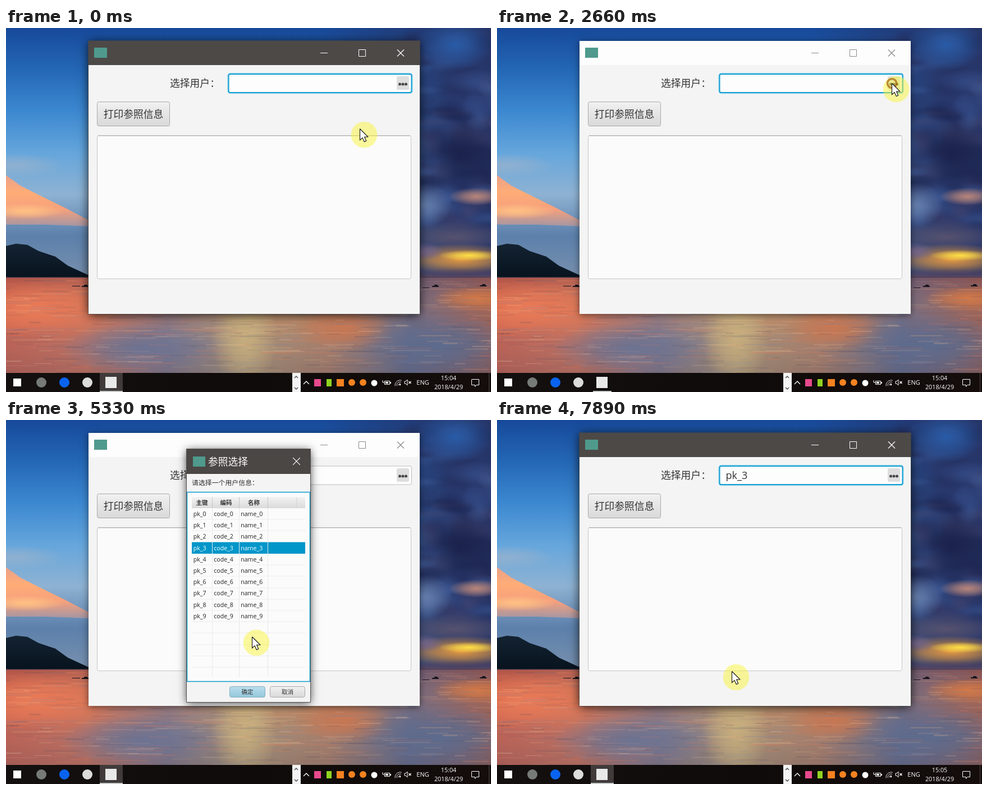
Recreate the animation shown at these times as an HTML page with a canvas. Size 864 by 648 pixels, loop 8 s.

```html
<!DOCTYPE html>
<html lang="zh-CN">
<head>
<meta charset="utf-8">
<style>
html, body { margin: 0; width: 100%; height: 100%; overflow: hidden; background: #100b09; }
canvas { display: block; }
</style>
</head>
<body>
<canvas id="stage" width="864" height="648"></canvas>
<script>
const W = 864, H = 648, LOOP = 8000, STEP = 120;
const FONT = '"Open Sans", "Noto Sans CJK SC", "Noto Sans CJK JP", "Noto Sans CJK", sans-serif';
const BLUE = '#0f9bd0';
const screen = document.getElementById('stage').getContext('2d');
let ctx = screen;

// Drawing helpers
function gradient(x0, y0, x1, y1, ...colors) {
  const g = ctx.createLinearGradient(x0, y0, x1, y1);
  colors.forEach((c, i) => g.addColorStop(i / (colors.length - 1), c));
  return g;
}
function rect(x, y, w, h, fill) {
  ctx.fillStyle = fill;
  ctx.fillRect(x, y, w, h);
}
function box(x, y, w, h, r, fill, stroke, width = 1) {
  ctx.beginPath();
  ctx.roundRect(x, y, w, h, r);
  if (fill) { ctx.fillStyle = fill; ctx.fill(); }
  if (stroke) { ctx.strokeStyle = stroke; ctx.lineWidth = width; ctx.stroke(); }
}
function disc(x, y, r, fill) {
  ctx.fillStyle = fill;
  ctx.beginPath();
  ctx.arc(x, y, r, 0, 7);
  ctx.fill();
}
function line(points, color, width = 1) {
  ctx.strokeStyle = color;
  ctx.lineWidth = width;
  ctx.beginPath();
  points.forEach(([x, y]) => ctx.lineTo(x, y));
  ctx.stroke();
}
function polygon(points, fill) {
  ctx.fillStyle = fill;
  ctx.beginPath();
  points.forEach(([x, y]) => ctx.lineTo(x, y));
  ctx.closePath();
  ctx.fill();
}
function text(str, x, y, size, color = '#333', align = 'left', weight = 400) {
  ctx.font = `${weight} ${size}px ${FONT}`;
  ctx.fillStyle = color;
  ctx.textAlign = align;
  ctx.textBaseline = 'alphabetic';
  ctx.fillText(str, x, y + size * 0.37);
}
function glow(x, y, rx, ry, color) {
  ctx.save();
  ctx.translate(x, y);
  ctx.scale(rx, ry);
  const g = ctx.createRadialGradient(0, 0, 0, 0, 0, 1);
  g.addColorStop(0, color);
  g.addColorStop(0.45, color + 'a0');
  g.addColorStop(1, color + '00');
  rect(-1, -1, 2, 2, g);
  ctx.restore();
}
function cross(x, y, r, color) {
  line([[x - r, y - r], [x + r, y + r]], color, 1.2);
  line([[x - r, y + r], [x + r, y - r]], color, 1.2);
}
function shadowed(draw, blur, color) {
  ctx.save();
  ctx.shadowColor = color;
  ctx.shadowBlur = blur;
  ctx.shadowOffsetY = 2;
  draw();
  ctx.restore();
}

function paintSky(random) {
  rect(0, 0, W, 444, gradient(0, 0, 0, 444, '#17499a', '#2467b5', '#3c88d0', '#65a6dc', '#8eb2d2', '#5c80ab', '#7890ae'));
  rect(560, 0, 304, 444, gradient(560, 0, 800, 0, '#26356800', '#263568'));
  const clouds = ['#171f49', '#232c5a', '#2c3c74', '#40609f', '#4b4a73'];
  for (let i = 0; i < 110; i++) {
    const y = 20 + random() * 340;
    ctx.globalAlpha = 0.45;
    glow(720 + random() * 160, y, 20 + random() * 35, 8 + random() * 18, clouds[Math.floor(random() * clouds.length)]);
  }
  ctx.globalAlpha = 1;
  glow(800, 30, 70, 45, '#285ba7');
  glow(810, 225, 80, 70, '#1b234c');
  glow(745, 315, 50, 40, '#6580ae');
  glow(838, 300, 50, 16, '#b98579');
  glow(800, 372, 100, 28, '#56526f');
  glow(810, 412, 110, 28, '#e59a42');
  glow(825, 405, 55, 10, '#ffdf46');
  glow(745, 398, 35, 16, '#75658a');
  rect(738, 428, 126, 16, gradient(0, 428, 0, 444, '#5d466000', '#574762'));

  glow(15, 245, 90, 22, '#8fb0d0');
  polygon([[0, 262], [26, 281], [62, 299], [105, 320], [147, 342], [147, 353], [70, 350], [0, 350]],
    gradient(0, 262, 0, 353, '#e9a18a', '#ffac77', '#f6a07c', '#a396a4'));
  glow(35, 326, 70, 14, '#ffc184');
  polygon([[0, 388], [18, 384], [38, 386], [58, 397], [88, 407], [110, 423], [147, 440], [147, 444], [0, 444]],
    gradient(0, 384, 0, 444, '#142332', '#07131e'));
}

function paintWater(random) {
  rect(0, 444, W, 171, gradient(0, 0, W, 0, '#cf604b', '#cf7259', '#887786', '#b29672', '#b38165', '#63698a', '#925c55'));
  rect(0, 444, W, 171, gradient(0, 444, 0, 615, '#743c4655', '#ed936025', '#6c718b30', '#4b506850'));
  glow(55, 500, 130, 50, '#e97b57');
  glow(245, 570, 150, 45, '#6c7392');
  glow(425, 550, 60, 90, '#c7ae7d');
  glow(600, 535, 90, 40, '#c77752');
  glow(770, 565, 140, 55, '#5d6b8d');
  glow(840, 482, 80, 24, '#d37947');
  const tones = ['#ffd3a5', '#49465f', '#ef7956', '#7185aa'];
  for (let i = 0; i < 650; i++) {
    const y = 446 + random() * 168;
    ctx.globalAlpha = 0.08 + random() * 0.12;
    rect(random() * 920 - 50, y, 12 + random() * 65, 1 + random() * 1.5, tones[i % 4]);
  }
  ctx.globalAlpha = 1;
  rect(0, 443, W, 2, '#523e4d99');
  [[141, 459], [765, 459], [850, 458]].forEach(([x, y]) => {
    rect(x - 6, y, 12, 2, '#17151b');
    rect(x - 2, y - 2, 6, 3, '#17151b');
  });
  rect(118, 459, 14, 1, '#17151b');
  rect(742, 462, 12, 1, '#17151b');
}

function paintTaskbar() {
  rect(0, 614, W, 34, gradient(0, 0, W, 0, '#14100f', '#0f0b0a', '#140d0b'));
  rect(13, 624, 14, 14, '#fff');
  disc(63, 631, 9, '#777b78');
  disc(104, 631, 9, '#0a63f0');
  disc(145, 631, 9, '#dcdcdc');

  rect(510, 614, 15, 34, '#f3f3f3');
  line([[514, 623], [517, 620], [520, 623]], '#444', 1.3);
  line([[514, 640], [517, 643], [520, 640]], '#444', 1.3);
  line([[530, 634], [535, 629], [540, 634]], '#fff', 1.3);
  rect(549, 625, 12, 13, '#e64a8c');
  rect(571, 625, 9, 13, '#90d321');
  rect(589, 625, 13, 13, '#f58220');
  disc(616, 631, 6, '#f58220');
  disc(636, 631, 6, '#f58220');
  disc(656, 632, 5.5, '#fff');

  box(674.5, 628.5, 9, 6, 0, null, '#fff');
  rect(684, 630, 2, 3, '#fff');
  rect(676, 630, 5, 3, '#fff');
  line([[671, 627], [671, 631], [674, 631]], '#fff');
  [3, 6, 9].forEach(r => {
    ctx.beginPath();
    ctx.arc(702, 636, r, Math.PI * 0.95, Math.PI * 1.6);
    ctx.strokeStyle = '#ddd';
    ctx.stroke();
  });
  disc(702, 635, 1.3, '#fff');
  line([[710, 629], [712, 629], [715, 626], [715, 636], [712, 633], [710, 633], [710, 629]], '#fff');
  cross(719.5, 631, 2, '#fff');
  text('ENG', 742.5, 631, 11, '#fff', 'center');
  text('2018/4/29', 788.5, 639, 10.8, '#fff', 'center');
  line([[830, 625.5], [842.5, 625.5], [842.5, 635.5], [838, 635.5], [835.5, 638.5], [835.5, 635.5], [829.5, 635.5], [829.5, 625.5]], '#fff');
  rect(860, 614, 1, 34, '#4a4644');
}

function makeBackdrop() {
  const canvas = document.createElement('canvas');
  canvas.width = W;
  canvas.height = H;
  let seed = 11;
  const random = () => (seed = (seed * 16807) % 2147483647) / 2147483647;
  ctx = canvas.getContext('2d');
  paintSky(random);
  paintWater(random);
  paintTaskbar();
  ctx = screen;
  return canvas;
}

function drawButton(x, y, w, h, label, size, { primary, focused } = {}) {
  const fill = primary ? gradient(0, y, 0, y + h, '#b9dfee', '#94c6dc') : gradient(0, y, 0, y + h, '#f1f1f1', '#d9d9d9');
  if (focused) box(x - 0.5, y - 0.5, w + 1, h + 1, 3, null, '#8fd3ec', 2);
  box(x, y, w, h, 3, fill, focused ? BLUE : primary ? '#86aebf' : '#a9a9a9', focused ? 1.5 : 1);
  text(label, x + w / 2, y + h / 2, size, '#333', 'center');
}

function drawWindow({ active, fieldFocused, value, caret }) {
  const ink = active ? '#fff' : '#8b8b8b';
  shadowed(() => rect(147, 23, 590, 486, '#f4f4f4'), active ? 17 : 12, active ? '#000c' : '#0008');
  rect(147, 23, 590, 43, active ? '#4d4947' : '#fdfdfd');
  if (active) box(146.5, 22.5, 591, 487, 0, null, '#4d494799');
  rect(157, 35, 23, 18, '#4f9a8c');
  line([[560, 44.5], [573, 44.5]], ink);
  box(628.5, 38.5, 12, 12, 0, null, ink);
  cross(703, 44.5, 6, ink);

  text('选择用户：', 292, 98, 17.8);
  if (fieldFocused) box(396, 81.5, 327, 34, 4, null, '#b5e2f2', 4);
  box(396.5, 82, 326, 33, 3, '#fdfdfd', fieldFocused ? BLUE : '#bdbdbd', fieldFocused ? 2 : 1);
  box(696, 86, 22, 24, 3, '#dedede');
  [701.5, 707, 712.5].forEach(x => disc(x, 100, 2.5, '#484848'));
  text(value, 407.5, 98, 18);
  if (caret) rect(406.5, 86, 1.5, 24, '#222');

  drawButton(162.5, 131.5, 129, 43, '打印参照信息', 17.8);
  box(162.5, 191.5, 559, 255, 3, '#fbfbfb', '#c6c6c6');
  rect(164, 191, 556, 1, '#acacac');
  rect(164, 192, 556, 1, '#e2e2e2');
}

function drawDialog({ picked, listFocused }) {
  const columns = [[331, 'pk', '主键', 349], [367.5, 'code', '编码', 392], [415.5, 'name', '名称', 441.5], [466.5]];
  const rowTop = i => 157 + i * 20.22;

  shadowed(() => rect(322, 52, 220, 450, '#f4f4f4'), 15, '#000b');
  rect(322, 52, 220, 44, '#4a4745');
  rect(333, 65, 22, 18, '#4f9a8c');
  text('参照选择', 360, 74, 17.8, '#fff');
  cross(517.5, 73.5, 6.3, '#fff');
  text('请选择一个用户信息：', 331, 112, 11.9);

  rect(322, 128, 220, 338, '#fbfbfb');
  rect(331, 137, 202, 20, gradient(0, 137, 0, 157, '#f3f3f3', '#dadada'));
  for (let i = 1; i < 15; i++) rect(331, Math.round(rowTop(i)) - 0.5, 202, 1, '#ededed');
  if (picked) rect(331, 217.5, 202, 20.5, listFocused ? '#0096c9' : '#d3d3d3');
  columns.forEach(([x, key, title, center], c) => {
    if (c) {
      rect(x - 0.5, 137, 1, 20, '#c5c5c5');
      rect(x - 0.5, 157, 1, 301, '#e9e9e9');
    }
    if (!key) return;
    text(title, center, 147, 10.5, '#333', 'center', 700);
    for (let i = 0; i < 10; i++) {
      const color = picked && listFocused && i === 3 ? '#fff' : '#222';
      text(`${key}_${i}`, x + 2.7, rowTop(i) + 10, 10.6, color);
    }
  });
  rect(517.5, 138, 1, 18, '#d2d2d2');
  if (listFocused) box(322.5, 128.5, 219, 337, 0, null, BLUE, 1.5);
  else [128, 465].forEach(y => rect(322, y, 220, 1, '#bdbdbd'));

  drawButton(398.5, 474.5, 63, 19, '确定', 10.6, { primary: true, focused: !listFocused });
  drawButton(470.5, 474.5, 62, 19, '取消', 10.6);
  box(321.5, 51.5, 221, 451, 0, null, '#55514f');
}

function drawTaskState(t) {
  const active = t < 2660 || t >= 3020;
  if (active) rect(167, 614, 41, 34, '#403b3a');
  rect(active ? 167 : 171, 646, active ? 41 : 33, 2, '#c9cdd0');
  rect(177, 621, 20, 20, '#e9e9e9');
  text(t < 7160 ? '15:04' : '15:05', 788.5, 623, 10.8, '#fff', 'center');
}

// Pointer: [time, x, y] of the halo centre
const path = [
  [0, 638, 190], [370, 638, 190], [610, 645, 182], [970, 680, 145], [1210, 700, 122], [1450, 715, 112],
  [1810, 711, 110], [2660, 711, 109], [2960, 711, 109], [3260, 604, 160], [3500, 515, 209], [3740, 472, 235],
  [4480, 472, 235], [4600, 468, 250], [4840, 451, 338], [5090, 451, 338], [5570, 441, 455], [5930, 438, 492],
  [7530, 438, 492], [7890, 426, 458], [8000, 426, 458]
];
const clicks = [2540, 4110, 6180];

function pointerAt(t) {
  const i = path.findIndex(p => p[0] > t);
  const [t0, x0, y0] = path[i - 1], [t1, x1, y1] = path[i];
  const k = (t - t0) / (t1 - t0);
  return [x0 + (x1 - x0) * k, y0 + (y1 - y0) * k];
}

function drawPointer(t) {
  const [x, y] = pointerAt(t);
  disc(x, y, 23.3, 'rgba(250, 246, 60, 0.5)');
  ctx.save();
  ctx.translate(x - 7.5, y - 10.5);
  const age = Math.min(...clicks.map(c => (t >= c ? t - c : Infinity)));
  if (age < 360) {
    ctx.globalAlpha = 1 - age / 360;
    ctx.beginPath();
    ctx.arc(0, 0, 8, 0, 7);
    ctx.strokeStyle = age ? '#a35a08' : '#f2641a';
    ctx.lineWidth = 3.6;
    ctx.stroke();
    ctx.globalAlpha = 1;
  }
  const arrow = [[0, 0], [0, 20], [4.6, 15.8], [7.8, 23], [11.2, 21.5], [8.1, 14.6], [14.3, 14.3], [0, 0]];
  polygon(arrow, '#fff');
  line(arrow, '#111', 1.1);
  ctx.restore();
}

// Bursts of refreshes: [start, number of steps]; the picture rests between them
const bursts = [[0, 2], [490, 13], [2180, 14], [4110, 3], [4600, 3], [5210, 7], [6180, 5], [7160, 3], [7650, 3]];

function snap(t) {
  const [start, count] = bursts.filter(b => b[0] <= t).pop();
  return start + Math.min(count - 1, Math.floor((t - start) / STEP)) * STEP;
}

const backdrop = makeBackdrop();
const within = (t, a, b) => t >= a && t < b;

function render(time) {
  const t = snap(time % LOOP);
  const dialogOpen = within(t, 3020, 7160);
  ctx.drawImage(backdrop, 0, 0);
  drawTaskState(t);
  ctx.save();
  ctx.beginPath();
  ctx.rect(0, 0, W, 614);
  ctx.clip();
  drawWindow({
    active: !within(t, 2660, 7160),
    fieldFocused: !dialogOpen,
    value: t >= 7160 ? 'pk_3' : '',
    caret: within(t, 490, 970) || within(t, 1450, 1930) || within(t, 7280, 7770)
  });
  if (dialogOpen) drawDialog({ picked: t >= 4110, listFocused: within(t, 4110, 6180) });
  drawPointer(t);
  ctx.restore();
}

const begin = performance.now();
function tick() {
  render(performance.now() - begin);
  requestAnimationFrame(tick);
}
tick();
</script>
</body>
</html>
```
